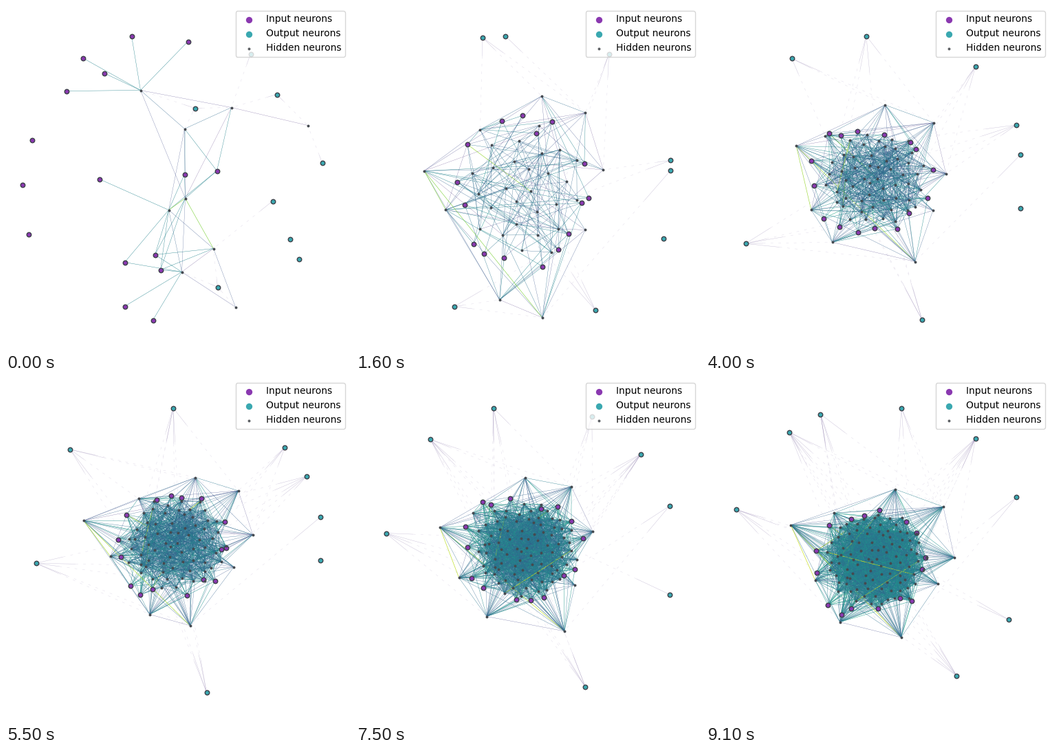
A matplotlib script that plays this animation: 500x500 px, repeating every 9200 ms.

```python
import numpy as np
import matplotlib.pyplot as plt
from matplotlib.animation import FuncAnimation
from matplotlib.collections import LineCollection

FRAMES, INTERVAL, SIZE = 92, 100, 500
N_IN, N_OUT, N_OUTER, N_INNER = 16, 8, 9, 95
INPUT, OUTPUT, OUTER, INNER = range(4)
N_RIM = N_IN + N_OUT + N_OUTER
SETTLE = 16
PURPLE, TEAL, DARK, RING = "#8a38b0", "#3aa8b0", "#454a50", "#3c4048"
rng = np.random.default_rng(7)

# Opening layout; every group runs clockwise
OPENING = np.array([
    (37, 194), (87, 123), (111, 75), (142, 97), (182, 43), (264, 51),
    (306, 239), (259, 244), (216, 361), (224, 383), (213, 456), (172, 372),
    (172, 436), (32, 331), (135, 251), (23, 259),
    (307, 408), (274, 148), (355, 69), (393, 128),
    (459, 227), (387, 283), (412, 338), (425, 367),
    (195, 122), (259, 178), (327, 147), (438, 173), (333, 437),
    (301, 352), (255, 386), (236, 296), (260, 279)], float)

# Directions of the outputs, in degrees, as they settle, midway and at the end
OUT_FRAMES = SETTLE, 55, FRAMES - 1
OUT_ANGLES = np.radians([
    (120, -108, -99, -57, -7, -3, 24, 63),
    (175, -137, -92, -44, -30, -13, 4, 79),
    (196, -127, -113, -81, -49, -21, 28, 58)])

kind = np.repeat(range(4), [N_IN, N_OUT, N_OUTER, N_INNER])
src, dst = np.triu_indices(len(kind), 1)


def by_kind(in_outer, in_inner, out_outer, out_inner,
            outer_outer, outer_inner, inner_inner):
    table = np.zeros((4, 4))
    table[INPUT, OUTER:] = in_outer, in_inner
    table[OUTPUT, OUTER:] = out_outer, out_inner
    table[OUTER, OUTER:] = outer_outer, outer_inner
    table[INNER, INNER] = inner_inner
    return table[kind[src], kind[dst]]


early = by_kind(.06, .16, .02, .03, .06, .14, .26)
late = by_kind(.10, .26, .04, .08, .10, .32, .60)
weight = by_kind(.26, .40, .1, .1, .22, .27, .32)
solid = weight > .2
weight += solid * rng.normal(0, .07, len(src))

# Older nodes gather more links; a few links shine
chance = rng.random(len(src)) * (1 + .7 * dst / len(kind))
hub = (src < N_IN) & (dst == N_RIM)
weight[hub | (solid & (rng.random(len(src)) < .004))] = .85

# The opening graph links hidden nodes to whatever lies within reach
start = np.flatnonzero((dst < N_RIM) & (kind[dst] == OUTER))
length = np.hypot(*(OPENING[src[start]] - OPENING[dst[start]]).T)
among_hidden = kind[src[start]] == OUTER
near = length < np.where(among_hidden, 170.5, 111.5)
chance[start[near]] = -1
core = among_hidden & (dst[start] == N_RIM - 1) & (length < 90)
weight[start[core]] = .82
weight[start[near & (kind[src[start]] == INPUT)]] = .45

order = np.arange(N_INNER)
golden = order * np.pi * (3 - 5 ** .5)
jitter = rng.normal(0, 2.5, (N_INNER, 2))


def make_ring(count, first, nearest, farthest):
    step = 2 * np.pi / count
    angle = first + step * (np.arange(count) + rng.uniform(-.3, .3, count))
    return angle, rng.uniform(nearest, farthest, count), rng.uniform(0, 6.28, count)


input_ring = make_ring(N_IN, -2.9, .85, 1.15)
outer_ring = make_ring(N_OUTER, -2.2, 1.1, 1.6)


def on_ellipse(center, radii, angle, scale):
    unit = np.column_stack([np.cos(angle), np.sin(angle)])
    return center + radii * unit * np.reshape(scale, (-1, 1))


def swaying(ring, frame, center, radii):
    angle, scale, phase = ring
    return on_ellipse(center, radii, angle + .15 * np.sin(frame / 7 + phase),
                      scale + .08 * np.sin(frame / 5 + 2 * phase))


def layout(frame):
    swell = np.exp(-((frame - 14) / 14) ** 2)
    center = np.array([246, 255 + 15 * np.cos(2 * np.pi * (frame - 14) / 91)])
    radii = np.array([74 + 10 * swell, 69 + 35 * swell])

    out_angle = [np.interp(frame, OUT_FRAMES, a) for a in OUT_ANGLES.T]
    outputs = np.clip(on_ellipse(250, 215, out_angle, 1), 43, 456.5)
    rim = np.vstack([swaying(input_ring, frame, center, radii + 10), outputs,
                     swaying(outer_ring, frame, center, radii + 10)])
    settled = min(frame / SETTLE, 1)
    rim = OPENING + (rim - OPENING) * settled

    count = N_INNER * (frame / (FRAMES - 1)) ** .72
    scale = np.sqrt((order + .5) / max(count, 1))
    inner = on_ellipse(center, radii, golden, scale) + jitter
    return np.vstack([rim, inner[:round(count)]]) + .5


fig = plt.figure(figsize=(SIZE / 100, SIZE / 100), dpi=100, facecolor="white")
ax = fig.add_axes([0, 0, 1, 1])
ax.set(xlim=(0, SIZE), ylim=(SIZE, 0))
ax.axis("off")


def add_lines(**style):
    return ax.add_collection(LineCollection([], zorder=1, **style))


pale = dict(linewidths=.3, colors=[plt.cm.viridis(.12)])
edges = add_lines()
stubs = add_lines(alpha=.3, **pale)
strays = add_lines(alpha=.18, linestyles=[(0, (9, 18))], **pale)

ring_style = dict(s=22, edgecolors=RING, linewidths=1, zorder=2)
inputs = ax.scatter([], [], c=PURPLE, **ring_style)
outputs = ax.scatter([], [], c=TEAL, **ring_style)
hidden = ax.scatter([], [], s=8, c=DARK, linewidths=0, zorder=3)

for color, size, label in ((PURPLE, 45, "Input neurons"),
                           (TEAL, 45, "Output neurons"),
                           ("#5c5f63", 8, "Hidden neurons")):
    ax.scatter([], [], s=size, c=color, linewidths=0, label=label)
ax.legend(loc="upper right", prop={"family": "DejaVu Sans", "size": 10})


def draw(frame):
    points = layout(frame)
    progress = max(frame - SETTLE, 0) / (FRAMES - 1 - SETTLE)
    density = (early + (late - early) * progress) * min(frame / SETTLE, 1)
    live = (chance < density) & (src < len(points)) & (dst < len(points))

    strong = live & solid
    w = np.clip(weight[strong] + .1 * progress, 0, 1)
    edges.set_segments(np.stack([points[src[strong]], points[dst[strong]]], axis=1))
    edges.set_color(plt.cm.viridis(w))
    edges.set_linewidths(.1 + .42 * w)

    faint = live & ~solid
    a, b = points[src[faint]], points[dst[faint]]
    fade = a + .2 * (b - a)
    stubs.set_segments(np.stack([a, fade], axis=1))
    strays.set_segments(np.stack([fade, b], axis=1))

    inputs.set_offsets(points[:N_IN])
    outputs.set_offsets(points[N_IN:N_IN + N_OUT])
    hidden.set_offsets(points[N_IN + N_OUT:])
    return edges, stubs, strays, inputs, outputs, hidden


anim = FuncAnimation(fig, draw, frames=FRAMES, interval=INTERVAL,
                     repeat=True, repeat_delay=0)
plt.show()
```
